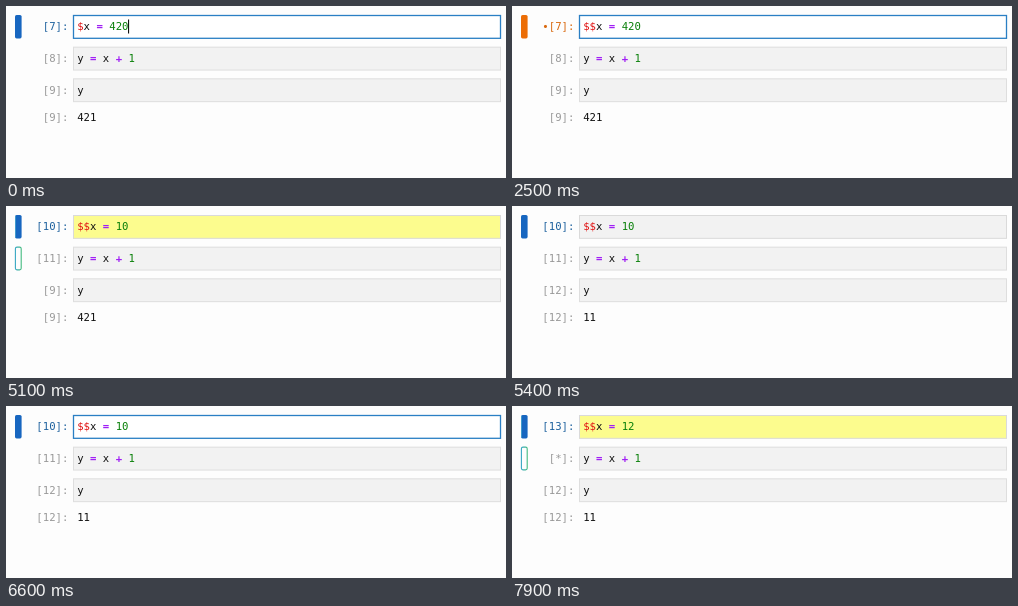
Recreate the animation shown at these times as an HTML page with a canvas. Size 500 px wide and 172 px high, loop 8 s.

```html
<!DOCTYPE html>
<html lang="en">
<head>
<meta charset="utf-8">
<title>Reactive notebook</title>
<style>
  html, body { margin: 0; width: 100%; height: 100%; overflow: hidden; background: #fdfdfd; }
  canvas { display: block; width: 500px; height: 172px; }
</style>
</head>
<body>
<canvas id="stage"></canvas>
<script>
const WIDTH = 500, HEIGHT = 172, LOOP = 8000, BLINK = 500;
const FONT = '10.65px "DejaVu Sans Mono", monospace';
const CODE_X = 71.2, PROMPT_RIGHT = 62.4;
const BLUE = '#1766c0', ORANGE = '#ec6d05', GRAY = '#999';
const ROWS = [9, 40.7, 72.4];

const canvas = document.getElementById('stage');
const ctx = canvas.getContext('2d');
const ratio = window.devicePixelRatio || 1;
canvas.width = WIDTH * ratio;
canvas.height = HEIGHT * ratio;
ctx.scale(ratio, ratio);

const start = {
  code: '$x = 420', caret: 8, key: 0, edit: true, dirty: false,
  flash: false, ready: false, counts: ['7', '8', '9'], out: '421'
};

// Each entry: time in ms and the properties that change then.
const edit = (time, code, caret, more) => [time, { code, caret, key: time, ...more }];
const move = (time, caret) => [time, { caret, key: time }];
const timeline = [
  move(100, 7), move(500, 5), move(600, 2), move(700, 0),
  edit(1000, '$$x = 420', 1, { dirty: true }),
  move(1400, 3), move(1500, 5), move(1600, 7), move(2000, 8), move(2600, 9),
  edit(3000, '$$x = 42', 8), edit(3200, '$$x = 4', 7), edit(3400, '$$x = ', 6),
  edit(3800, '$$x = 1', 7), edit(4000, '$$x = 10', 8),
  [4900, { edit: false, dirty: false, counts: ['*', '8', '9'] }],
  [5000, { flash: true, ready: true, counts: ['10', '*', '9'] }],
  [5100, { counts: ['10', '11', '9'] }],
  [5200, { counts: ['10', '11', '*'] }],
  [5300, { counts: ['10', '11', '12'], out: '11' }],
  [5400, { flash: false, ready: false }],
  [6000, { edit: true, key: 6100 }],
  edit(6800, '$$x = 1', 7, { dirty: true }),
  edit(6900, '$$x = 12', 8),
  [7800, { edit: false, dirty: false, counts: ['*', '11', '12'] }],
  [7900, { flash: true, ready: true, counts: ['13', '*', '12'] }]
];

function stateAt(time) {
  const past = timeline.filter(([at]) => at <= time).map(([, change]) => change);
  return Object.assign({}, start, ...past);
}

function text(string, x, y, color, bold) {
  ctx.font = (bold ? 'bold ' : '') + FONT;
  ctx.fillStyle = color;
  ctx.fillText(string, x, y);
}

function charWidth() {
  ctx.font = FONT;
  return ctx.measureText('0').width;
}

function drawCode(code, top) {
  const step = charWidth();
  for (const { 0: token, index } of code.matchAll(/\$+|\d+|[=+]|\w+/g)) {
    const operator = /[=+]/.test(token);
    const color = operator ? '#a020f5' : token[0] === '$' ? '#e01010' : /\d/.test(token) ? '#0a800a' : '#111';
    text(token, CODE_X + index * step, top + 15.3, color, operator);
  }
}

function drawPrompt(label, top, color) {
  text(label, PROMPT_RIGHT - label.length * charWidth(), top + 15.3, color);
}

function drawBox(top, fill, border, line = 1) {
  ctx.fillStyle = fill;
  ctx.fillRect(67, top, 428, 23.6);
  ctx.strokeStyle = border;
  ctx.lineWidth = line;
  ctx.strokeRect(67.5, top + 0.5, 427, 22.8);
}

function pill(x, top, width, height) {
  ctx.beginPath();
  ctx.roundRect(x, top, width, height, 1.6);
}

function drawReadyMark(top) {
  const shade = ctx.createLinearGradient(9, 0, 16, 0);
  shade.addColorStop(0, '#35a5c8');
  shade.addColorStop(1, '#45bd78');
  pill(9.4, top + 0.4, 5.8, 22.8);
  ctx.strokeStyle = shade;
  ctx.lineWidth = 1.1;
  ctx.stroke();
}

function drawActiveCell(state, time) {
  const top = ROWS[0];
  const color = state.dirty ? ORANGE : BLUE;
  pill(9, top, 6.6, 23.4);
  ctx.fillStyle = color;
  ctx.fill();
  if (state.ready) {
    ctx.fillStyle = '#4aa8d0';
    ctx.fillRect(9, top + 1, 0.8, 21.4);
  }

  if (state.edit) drawBox(top, '#fff', '#2a7fc4', 1.3);
  else drawBox(top, state.flash ? '#fcfc8e' : '#f2f2f2', '#dadada');

  const label = `${state.dirty ? '•' : ''}[${state.counts[0]}]:`;
  drawPrompt(label, top, state.dirty ? '#d9690f' : '#20639f');
  drawCode(state.code, top);

  if (state.edit && Math.floor((time - state.key) / BLINK) % 2 === 0) {
    ctx.fillStyle = '#111';
    ctx.fillRect(Math.round(CODE_X + state.caret * charWidth() - 0.3), 13.5, 1.1, 14);
  }
}

function draw(time) {
  const state = stateAt(time);
  ctx.fillStyle = '#fdfdfd';
  ctx.fillRect(0, 0, WIDTH, HEIGHT);
  drawActiveCell(state, time);

  ['y = x + 1', 'y'].forEach((code, i) => {
    const top = ROWS[i + 1];
    drawBox(top, '#f2f2f2', '#dedede');
    drawPrompt(`[${state.counts[i + 1]}]:`, top, GRAY);
    drawCode(code, top);
  });
  if (state.ready) drawReadyMark(ROWS[1]);

  const count = state.counts[2] === '*' ? '9' : state.counts[2];
  drawPrompt(`[${count}]:`, 100, GRAY);
  text(state.out, CODE_X, 115.3, '#111');
}

function tick() {
  draw(performance.now() % LOOP);
  requestAnimationFrame(tick);
}
tick();
</script>
</body>
</html>
```
